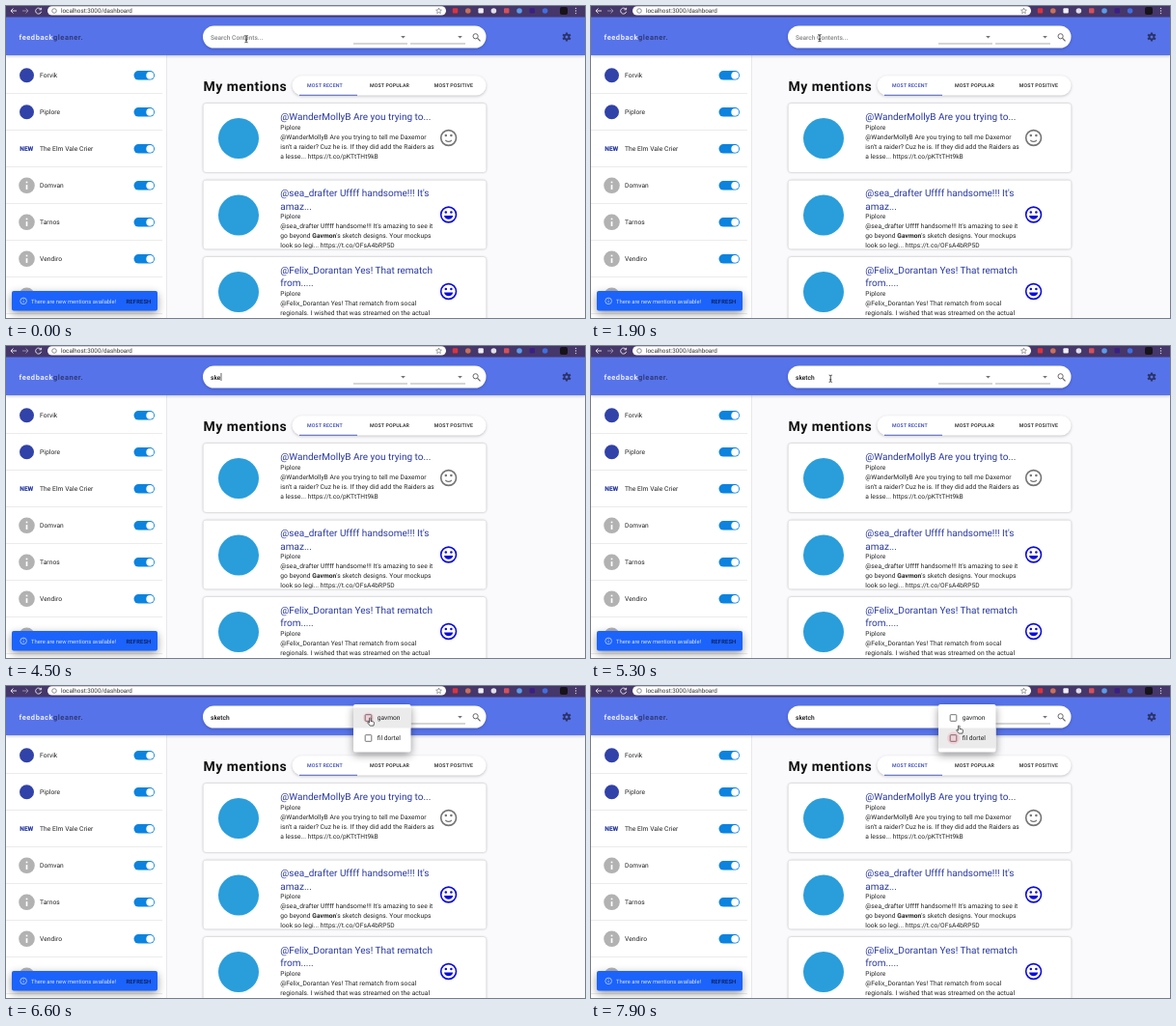
Recreate the animation shown at these times as an HTML page. Size 600x323 px, loop 8000 ms.

```html
<!DOCTYPE html>
<html lang="en">
<head>
<meta charset="utf-8">
<title>Mentions dashboard</title>
<style>
html, body { margin: 0; width: 100%; height: 100%; overflow: hidden; background: #fafafc; }
svg { display: block; width: 600px; height: 323px; font-family: Roboto, Arial, sans-serif; text-rendering: geometricPrecision; }
.card { filter: drop-shadow(0 .8px .8px rgba(0,0,0,.32)); }
.soft { filter: drop-shadow(0 1px 1.5px rgba(0,0,0,.22)); }
.menu { filter: drop-shadow(0 3px 4px rgba(0,0,0,.4)); }
</style>
</head>
<body>
<svg id="stage" viewBox="0 0 600 323"></svg>
<script>
const LOOP = 8000;
const stage = document.getElementById('stage');
const $ = id => document.getElementById(id);

const text = (x, y, str, size, fill = '#222', extra = '') =>
  `<text x="${x}" y="${y}" font-size="${size}" fill="${fill}" ${extra}>${str}</text>`;
const rect = (x, y, w, h, fill, r = 0, extra = '') =>
  `<rect x="${x}" y="${y}" width="${w}" height="${h}" rx="${r}" fill="${fill}" ${extra}/>`;
const circle = (x, y, r, fill, extra = '') =>
  `<circle cx="${x}" cy="${y}" r="${r}" fill="${fill}" ${extra}/>`;
const path = (d, fill, extra = '') => `<path d="${d}" fill="${fill}" ${extra}/>`;
const line = (d, color, w = 1, extra = '') =>
  path(d, 'none', `stroke="${color}" stroke-width="${w}" ${extra}`);

function browserBar() {
  const icons = ['#d8343f', '#c8705a', '#f0f0f4', '#e0dfe8', '#d4505a', '#5b9be8', '#3b1f86', '#3f6ee0'];
  return rect(0, 0, 600, 11.5, '#45376a') + rect(43, .2, 413, 9.4, '#fff', 4.7) +
    line('M11 5H5M7.5 2.5L5 5L7.5 7.5', '#eee', .9) +
    line('M17 5H23M20.5 2.5L23 5L20.5 7.5', '#9a92ae', .9) +
    line('M36 3.2A3 3 0 1 0 36.6 5.8M36.6 1.8V3.8H34.4', '#eee', .9) +
    circle(50, 5, 2.3, 'none', 'stroke="#666" stroke-width=".7"') +
    text(57, 7, 'localhost:3000/dashboard', 6.3, '#333') +
    path('M448.5 2l.8 2 2.1.2-1.6 1.4.5 2.1-1.8-1.1-1.8 1.1.5-2.1-1.6-1.4 2.1-.2z', 'none', 'stroke="#666" stroke-width=".6"') +
    icons.map((c, i) => {
      const x = 465.5 + 13.3 * i;
      return i % 2 ? circle(x, 5, 2.8, c) : rect(x - 2.7, 2.2, 5.4, 5.4, c, 1);
    }).join('') +
    rect(574, 1, 8, 8, '#17131a', 2) + [2.4, 5, 7.6].map(y => circle(590.5, y, .7, '#ddd')).join('');
}

function gear(x, y) {
  const teeth = [0, 60, 120].map(a =>
    rect(-1.1, -4.6, 2.2, 9.2, '#2c3468', .4, `transform="rotate(${a})"`)).join('');
  return `<g transform="translate(${x} ${y})">${teeth}${circle(0, 0, 3.3, '#2c3468')}${circle(0, 0, 1.5, '#5773ea')}</g>`;
}

function header() {
  const down = x => path(`M${x - 2.4} 31h4.8l-2.4 2.5z`, '#757575');
  return `<g class="soft">${rect(0, 11, 600, 40, '#5773ea')}</g>` +
    `<text x="13.5" y="34.5" font-size="7.5" font-weight="700" letter-spacing=".55" fill="#e8ecff">feedback<tspan fill="#303a78">gleaner.</tspan></text>` +
    `<g class="soft">${rect(204, 20.5, 293.5, 23, '#fff', 11.5)}</g>` +
    `<text id="query" x="212" y="34.5" font-size="6.6" font-weight="500"></text>` +
    rect(0, 28, .7, 8, '#222', 0, 'id="caret"') +
    line('M360 39H416M419 39H476', '#8b8b8b', .7) + down(411.5) + down(470.5) +
    circle(486.6, 31.3, 2.6, 'none', 'stroke="#666" stroke-width="1"') +
    line('M488.6 33.4L491.5 36.4', '#666', 1.2) + gear(581, 32);
}

function info(x, y, r, fill, mark) {
  return circle(x, y, r, fill) + rect(x - r * .1, y - r * .08, r * .2, r * .58, mark) +
    rect(x - r * .1, y - r * .5, r * .2, r * .2, mark);
}

function sidebar() {
  const names = ['Forvik', 'Piplore', 'The Elm Vale Crier', 'Domvan', 'Tarnos', 'Vendiro', ''];
  const icon = (i, y) => i < 2 ? circle(21.5, y, 7.5, '#3142a8')
    : i == 2 ? text(14.3, y + 2.5, 'NEW', 6.6, '#25399f', 'font-weight="900"')
    : info(21.5, y, 8.3, '#b2b2b2', '#fff');
  return rect(0, 51, 166, 272, '#fff') + line('M166.5 51V323', '#e4e4e6', .8) +
    names.map((name, i) => {
      const y = 71.8 + 38 * i;
      return icon(i, y) + text(35, y + 2.5, name, 6.67, '#222', 'letter-spacing=".06"') +
        rect(132.5, y - 4.8, 21.5, 9.6, '#0c83df', 4.8) + circle(149.2, y, 3.9, '#fff') +
        line(`M0 ${y + 18.7}H162`, '#e2e2e2', .7);
    }).join('');
}

function face(y, happy) {
  const c = happy ? '#0d0ddb' : '#757575', x = 458.6;
  const mouth = happy ? path(`M${x - 4.6} ${y + 1}h9.2a4.7 4.7 0 0 1-9.2 0z`, c)
    : line(`M${x - 3.3} ${y + 2.5}q3.3 2.8 6.6 0`, c, 1.1);
  return circle(x, y, 7.9, 'none', `stroke="${c}" stroke-width="1.6"`) +
    circle(x - 2.8, y - 2.4, 1.25, c) + circle(x + 2.8, y - 2.4, 1.25, c) + mouth;
}

function card(top, titles, titleY, body, happy) {
  const subY = titleY[titleY.length - 1] + (titles.length > 1 ? 9.8 : 10.8);
  return `<g class="card">${rect(204.5, top, 293, 71, '#fff', 3)}</g>` +
    circle(241, top + 36, 21, '#2a9edb') +
    `<svg x="204" y="${top}" width="294" height="71" viewBox="204 ${top} 294 71">` +
    titles.map((s, i) => text(284.3, titleY[i], s, 10, '#2a3a9f')).join('') +
    [['Piplore'], body].flat().map((s, i) =>
      text(284.3, subY + 10 * i, s, 6.67, '#222', 'letter-spacing=".06"')).join('') +
    '</svg>' + face(top + 35.5, happy);
}

function mentions() {
  const tab = (x, s, fill) => text(x, 84, s, 5.25, fill, 'font-weight="500" text-anchor="middle" letter-spacing=".15"');
  return text(204.5, 87.7, 'My mentions', 14, '#111', 'font-weight="700" letter-spacing=".45"') +
    `<g class="soft">${rect(296.5, 72.2, 201, 20.4, '#fff', 10.2)}</g>` +
    tab(330.5, 'MOST RECENT', '#3546b5') + tab(397.5, 'MOST POPULAR') + tab(464, 'MOST POSITIVE') +
    rect(304, 91.8, 60, .9, '#3f51b5') +
    card(101, ['@WanderMollyB Are you trying to...'], [117.5], [
      '@WanderMollyB Are you trying to tell me Daxemor',
      "isn't a raider? Cuz he is. If they did add the Raiders as",
      'a lesse... https://t.co/pKTtTHt9kB'], false) +
    card(180.5, ["@sea_drafter Uffff handsome!!! It's", 'amaz...'], [197, 210.5], [
      "@sea_drafter Uffff handsome!!! It's amazing to see it",
      'go beyond <tspan font-weight="700">Gavmon</tspan>\'s sketch designs. Your mockups',
      'look so legi... https://t.co/OFsA4bRP5D'], true) +
    card(260, ['@Felix_Dorantan Yes! That rematch', 'from.....'], [276.5, 289.8], [
      '@Felix_Dorantan Yes! That rematch from socal',
      'regionals. I wished that was streamed on the actual'], true);
}

function snackbar() {
  return `<g class="menu">${rect(6, 295, 151, 20.5, '#1b63fa', 2)}</g>` +
    circle(18.1, 305.4, 3.3, 'none', 'stroke="#d5e1ff" stroke-width=".7"') +
    line('M18.1 304.9V307.1M18.1 303.3V304.1', '#d5e1ff', .7) +
    text(26, 307.6, 'There are new mentions available!', 5.83, '#d5e1ff') +
    text(124.5, 307.6, 'REFRESH', 5.83, '#0c1a4c', 'font-weight="500" letter-spacing=".17"');
}

function menu() {
  const row = (y, s) => rect(372.2, y - 3.3, 6.6, 6.6, 'none', .7, 'stroke="#666" stroke-width=".9"') +
    text(384.7, y + 2.3, s, 6.67);
  return `<g id="menu" class="menu">${rect(360, 19, 59.5, 49.5, '#fff', 2)}` +
    rect(360, 0, 59.5, 21, '#ebebeb', 0, 'id="hover"') +
    circle(375.5, 0, 6, '#f5c6d0', 'id="ripple" opacity=".75"') +
    row(33, 'gavmon') + row(54, 'fil dortel') + '</g>';
}

function cursors() {
  return '<g id="pointer">' +
    `<g id="ibeam">${line('M-1.6 -3.5Q0 -3.5 0 -2.4V2.8Q0 3.8 -1.6 3.8M1.6 -3.5Q0 -3.5 0 -2.4M0 2.8Q0 3.8 1.6 3.8M-1 1.2H1', '#222', .8)}</g>` +
    `<g id="arrow">${path('M-1.5 -3.5V3l1.5-1.3 1.1 2.3 1-.5-1.1-2.2 2-.1z', '#111', 'stroke="#fff" stroke-width=".4"')}</g>` +
    `<g id="hand">${path('M-1.4 -3.8q.9-.8 1.4.3V-.6l2.7.6q.9.3.8 1.3l-.6 2.8H-.8L-3.3 1q0-1 1-.6l.9.7z', '#fff', 'stroke="#222" stroke-width=".7"')}</g></g>`;
}

stage.innerHTML = rect(0, 0, 600, 323, '#fafafc') + mentions() + sidebar() + header() +
  browserBar() + snackbar() + menu() + cursors();

// Pointer track: time, x, y
const track = [[0, 249, 34], [900, 249, 34], [1700, 237, 33], [5200, 237, 33],
  [5800, 386, 41], [6000, 386, 41], [6450, 378, 37], [7300, 378, 37], [7600, 382, 45], [LOOP, 382, 45]];
const typed = [4100, 4300, 4450, 4700, 4900, 5050];
const FOCUS = 2500, OPEN = 6150, SECOND = 7400;

function pointerAt(t) {
  const i = track.findIndex((k, n) => n && t <= k[0]);
  const [a, b] = [track[i - 1], track[i]];
  let u = (t - a[0]) / (b[0] - a[0]);
  u = u * u * (3 - 2 * u);
  return [a[1] + (b[1] - a[1]) * u, a[2] + (b[2] - a[2]) * u];
}

const show = (id, on) => $(id).setAttribute('visibility', on ? 'visible' : 'hidden');

function draw(t) {
  const query = 'sketch'.slice(0, typed.filter(k => t >= k).length);
  $('query').textContent = query || 'Search Contents...';
  $('query').setAttribute('fill', query ? '#111' : '#858585');
  $('caret').setAttribute('x', query ? 212.3 + $('query').getComputedTextLength() : 211.7);
  show('caret', t >= FOCUS && t < 5800 && (t - FOCUS + 100) % 1000 < 500);

  const [x, y] = pointerAt(t);
  $('pointer').setAttribute('transform', `translate(${x} ${y})`);
  show('ibeam', t < 3000 || t >= 5200 && x < 355);
  show('arrow', t >= 5200 && x >= 355 && t < OPEN);
  show('hand', t >= OPEN);

  const grow = Math.max(0, Math.min(1, (t - OPEN) / 220));
  const scale = .75 + .25 * grow;
  const second = t >= SECOND;
  $('menu').setAttribute('opacity', grow);
  $('menu').setAttribute('transform', `translate(390 33) scale(${scale}) translate(-390 -33)`);
  $('hover').setAttribute('y', second ? 43.5 : 22.5);
  $('ripple').setAttribute('cy', second ? 54 : 33);
  $('ripple').setAttribute('r', 6 + .6 * Math.sin(t / 400));
}

function tick() {
  draw(performance.now() % LOOP);
  requestAnimationFrame(tick);
}
tick();
</script>
</body>
</html>
```
